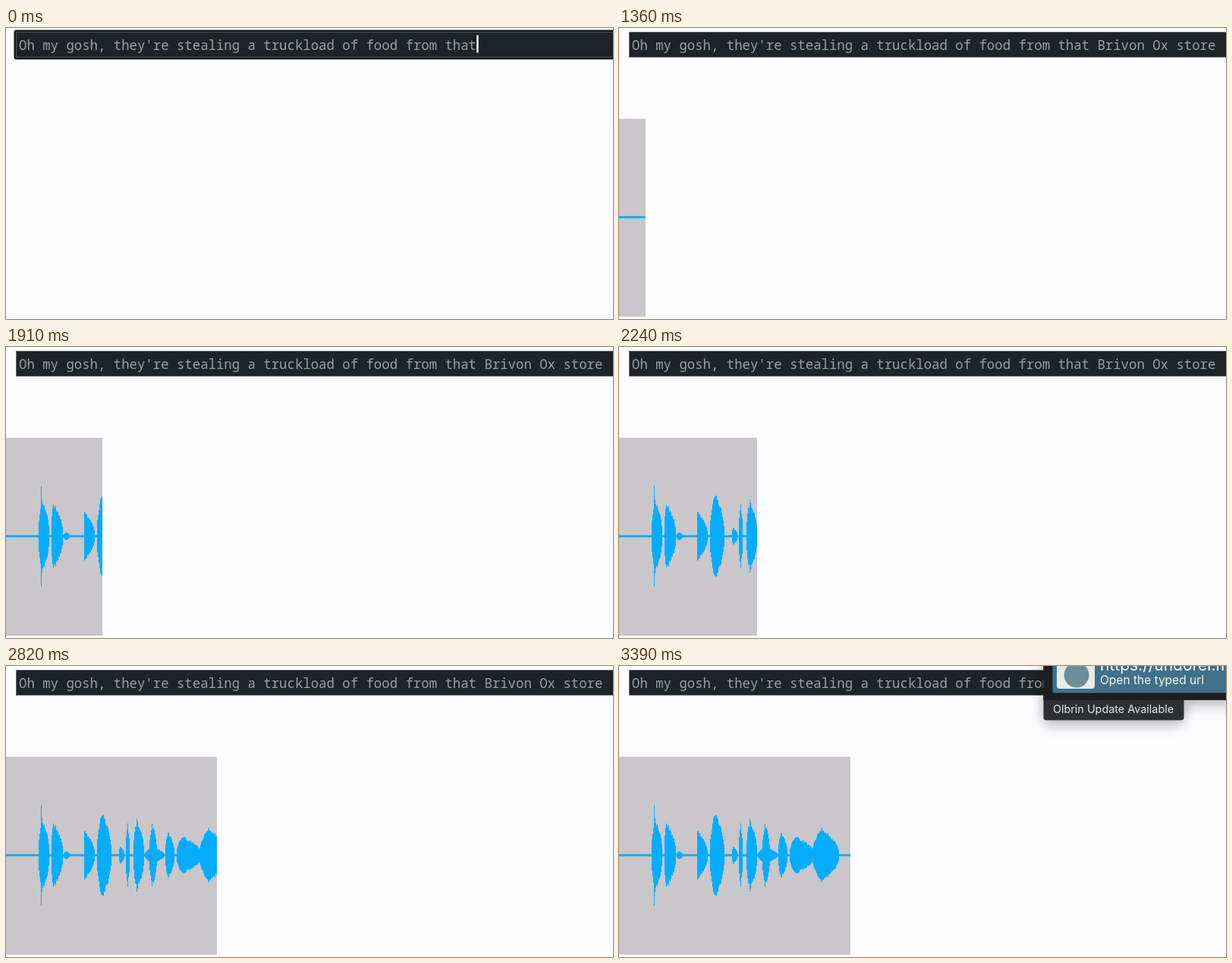
Animation, 800 px wide and 384 px high, one loop 3.45 s. Source, as an HTML page with a canvas:

```html
<!DOCTYPE html>
<html lang="en">
<head>
<meta charset="utf-8">
<title>Typed sentence and sound wave</title>
<style>
  html, body { margin: 0; width: 100%; height: 100%; overflow: hidden; background: #fefdff; }
  canvas { display: block; }
</style>
</head>
<body>
<canvas id="stage" width="800" height="384"></canvas>
<script>
const ctx = document.getElementById('stage').getContext('2d');
const LOOP = 3450, BLUR = 1180, POPUP = 3150;
const SENTENCE = "Oh my gosh, they're stealing a truckload of food from that Brivon Ox store";
const CHAR_WIDTH = 10.4, TEXT_X = 17;
const WAVE_END = 305, WAVE_Y = 249.7, SILENCE = 1.4;

// Syllables of the recording: start, peak, end, loudness.
const SYLLABLES = [
  [42, 47, 57, 50], [45, 46, 47, 72], [59, 62, 75, 46], [75, 79, 84, 6],
  [102, 103, 117, 34], [119, 126, 139, 60], [148, 150, 156, 13], [157, 160, 163, 42],
  [167, 172, 182, 49], [182, 192, 209, 11], [188, 192, 199, 44], [209, 213, 222, 32],
  [224, 232, 258, 26], [254, 266, 290, 38]
];

// Seeded roughness between 0 and 1 for each column.
const noise = x => Math.abs(Math.sin(x * 127.1) * 43758.5) % 1;

function loudness(x, [start, peak, end, height]) {
  const slope = x < peak ? (x - start) / (peak - start) : (end - x) / (end - peak);
  return height * Math.sqrt(Math.max(0, slope)) * (1 - 0.16 * noise(x));
}

const wave = Array.from({ length: WAVE_END }, (_, x) =>
  Math.max(SILENCE, ...SYLLABLES.map(syllable => loudness(x, syllable))));

function rect(color, x, y, w, h, radius = 0) {
  ctx.fillStyle = color;
  ctx.beginPath();
  ctx.roundRect(x, y, w, h, radius);
  ctx.fill();
}

function label(text, x, y, size, color, family = 'Inter, sans-serif') {
  ctx.font = `${size}px ${family}`;
  ctx.fillStyle = color;
  ctx.fillText(text, x, y);
}

function typedCount(t) {
  if (t < 90) return 58;
  if (t < 670) return Math.min(69, 59 + Math.floor((t - 90) / 52));
  return Math.min(SENTENCE.length, 70 + Math.floor((t - 670) / 30));
}

function drawInput(t) {
  const focused = t < BLUR;
  if (focused) rect('#0e181d', 10.5, 2.5, 820, 39, 3);
  rect(focused ? '#4b5155' : '#676d70', 13, 5, 820, 34);
  rect('#1d2328', 14, 6, 820, 32);
  const count = typedCount(t);
  label(SENTENCE.slice(0, count), TEXT_X, 28.5, CHAR_WIDTH / 0.6, '#9da0a1',
    '"Noto Sans Mono", monospace');
  if (focused) rect('#fff', TEXT_X + count * CHAR_WIDTH, 9.5, 2.5, 23);
}

function drawWave(t) {
  const width = Math.round(Math.min(WAVE_END, (t - 1150) * 0.1666));
  rect('#c9c7c9', 0, 119.7, width, 261.3);
  ctx.fillStyle = '#04adff';
  for (let x = 0; x < width; x++) ctx.fillRect(x, WAVE_Y - wave[x], 1, wave[x] * 2);
}

function drawPopup() {
  ctx.save();
  ctx.shadowColor = 'rgba(0, 0, 0, 0.3)';
  ctx.shadowBlur = 18;
  ctx.shadowOffsetY = 6;
  rect('#1c1e20', 559.5, -20, 260, 65);
  rect('#2d2f31', 559.5, 40, 185, 31.5, [0, 0, 4, 4]);
  ctx.restore();
  rect('#1c1e20', 559.5, -20, 260, 65);
  rect('#40718a', 571.5, -20, 240, 55.5);
  rect('#e9e9e9', 577, -20, 50, 50, 4);
  rect('#6f8c9b', 586.5, -4.5, 33, 33, 16.5);
  label('https://undorel.m', 634, 5.5, 21, '#fff', '500 Inter, sans-serif'.slice(4));
  label('Open the typed url', 634, 24, 15.5, '#f2f4f5');
  label('Olbrin Update Available', 572, 61.5, 14.4, '#e8e8e8');
}

function draw(now) {
  const t = now % LOOP;
  rect('#fefdff', 0, 0, 800, 384);
  drawInput(t);
  if (t >= BLUR) drawWave(t);
  if (t >= POPUP) drawPopup();
  requestAnimationFrame(draw);
}
requestAnimationFrame(draw);
</script>
</body>
</html>
```
